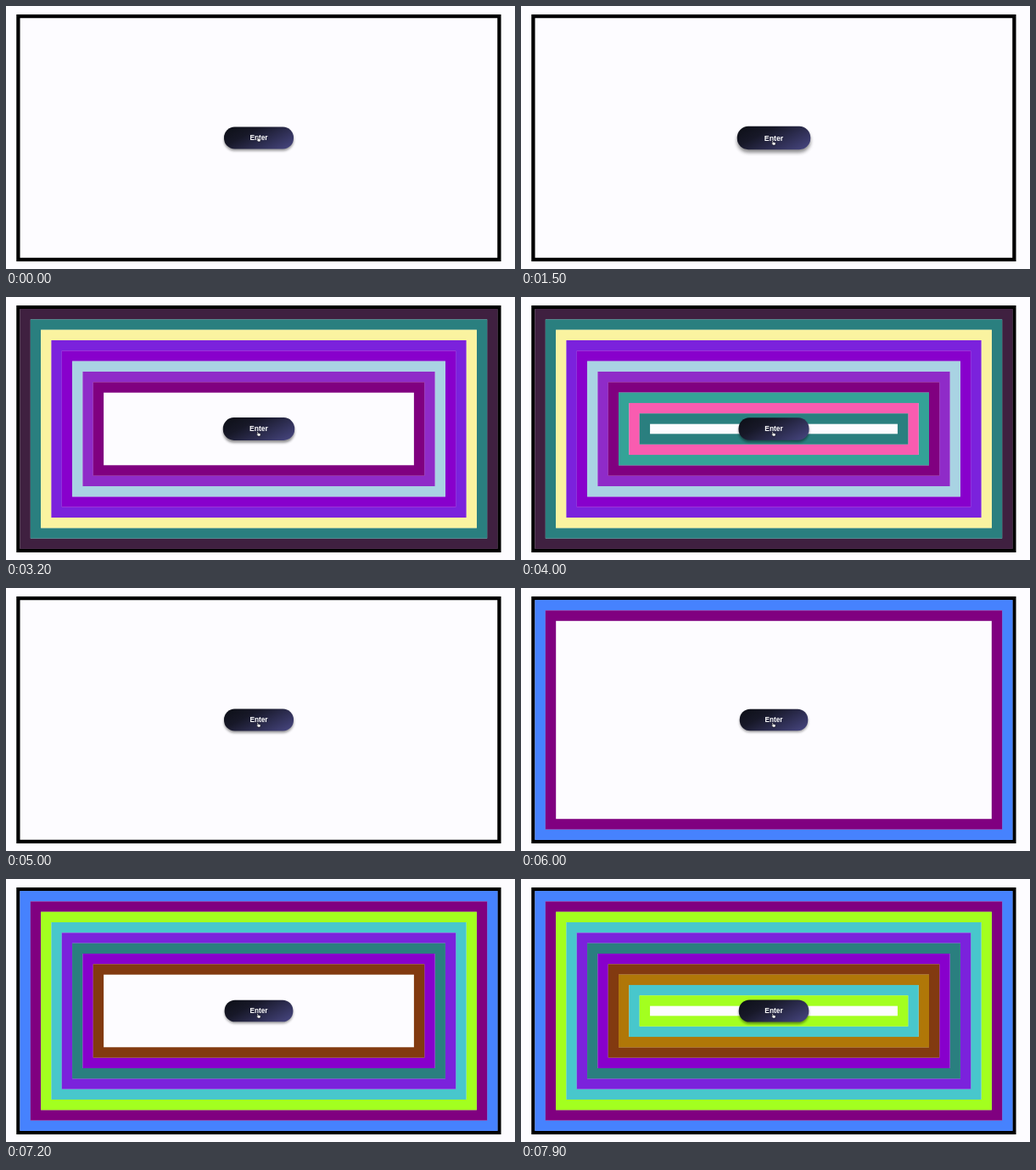
Write an HTML page that moves like this. It is 600x310 px and loops after 8 s.

```html
<!DOCTYPE html>
<html lang="en">
<head>
<meta charset="utf-8">
<style>
  html, body { margin: 0; width: 100%; height: 100%; overflow: hidden; background: #fdfcff; }
  svg { display: block; width: 600px; height: 310px; }
  text { font: bold 8.3px "Liberation Sans", Arial, sans-serif; fill: #fff; text-anchor: middle; }
</style>
</head>
<body>
<svg viewBox="0 0 600 310">
  <defs>
    <linearGradient id="night" x1="0" y1="0.2" x2="1" y2="0.8">
      <stop offset="0" stop-color="#0f111a"/>
      <stop offset="0.3" stop-color="#171828"/>
      <stop offset="1" stop-color="#434279"/>
    </linearGradient>
    <filter id="soft" x="-20%" y="-50%" width="140%" height="200%">
      <feGaussianBlur stdDeviation="1.8"/>
    </filter>
  </defs>
  <rect width="600" height="310" fill="#fdfcff"/>
  <rect x="14.4" y="12.1" width="567" height="286.8" fill="none" stroke="#000" stroke-width="4.3"/>
  <g id="rings"></g>
  <g id="button">
    <rect id="shadow" x="-41" y="-13" width="82" height="26" rx="12.5" filter="url(#soft)"/>
    <rect x="-41" y="-13" width="82" height="26" rx="12.5" fill="url(#night)"/>
    <text y="2.9">Enter</text>
  </g>
  <path id="hand" d="M-1.6-2.6q.6-.7 1.1 0l.4 1.5 2.2.6q.7.3.5 1.2l-.5 1.9H-.2L-2.2.5q0-.8 1-.3z"
        fill="#fff" stroke="#14141f" stroke-width=".6"/>
</svg>
<script>
  const LOOP = 8000, CLEAR = 5000, STEP = 200, PITCH = 12.32;
  const runs = [
    { start: 1650, end: CLEAR, colors: ['#3f2040', '#2a7f7f', '#faf3a0', '#7b22dc', '#8800cc',
      '#a9d3e3', '#8f2bc8', '#800080', '#34a397', '#f95cb0', '#2a7f7f'] },
    { start: 5750, end: LOOP, colors: ['#4682fe', '#800080', '#a3ff1f', '#48c7cc', '#7b22dc',
      '#2a7f7f', '#8800cc', '#823a10', '#b07708', '#48c7cc', '#a3ff1f'] }
  ];
  // [time, button width]
  const widths = [[0, 82], [100, 82], [600, 86.5], [1500, 86.5], [2500, 85.5], [4000, 83],
    [4600, 82], [5500, 82], [6500, 79], [7900, 82.5], [LOOP, 82.5]];

  const $ = id => document.getElementById(id);
  const smooth = x => { x = Math.min(1, Math.max(0, x)); return x * x * (3 - 2 * x); };

  function ring(i, color) {
    const d = (i + 0.5) * PITCH;
    const el = document.createElementNS('http://www.w3.org/2000/svg', 'rect');
    const attrs = { x: 16.5 + d, y: 14.1 + d, width: 563 - 2 * d, height: 282.8 - 2 * d,
      fill: 'none', stroke: color, 'stroke-width': PITCH + 0.1 };
    for (const k in attrs) el.setAttribute(k, attrs[k]);
    return $('rings').appendChild(el);
  }
  for (const run of runs) run.rings = run.colors.map((c, i) => ring(i, c));

  function widthAt(t) {
    const i = Math.max(1, widths.findIndex(k => t <= k[0]));
    const [t0, a] = widths[i - 1], [t1, b] = widths[i];
    return a + (b - a) * smooth((t - t0) / (t1 - t0));
  }

  function draw(t) {
    for (const { start, end, rings } of runs) {
      rings.forEach((el, i) => {
        const on = t >= start + i * STEP && t < end;
        el.setAttribute('visibility', on ? 'visible' : 'hidden');
      });
    }
    const s = widthAt(t) / 82;
    const lift = (s - 0.95) * 10;
    $('button').setAttribute('transform', `translate(298 155.5) scale(${s})`);
    $('shadow').setAttribute('transform', `translate(0 ${1.2 + 2 * lift})`);
    $('shadow').setAttribute('opacity', 0.35 + 0.1 * lift);
    const y = 157.3 + 4.2 * smooth((t - 50) / 400);
    $('hand').setAttribute('transform', `translate(297.5 ${y})`);
  }

  const tick = () => {
    draw(performance.now() % LOOP);
    requestAnimationFrame(tick);
  };
  tick();
</script>
</body>
</html>
```
